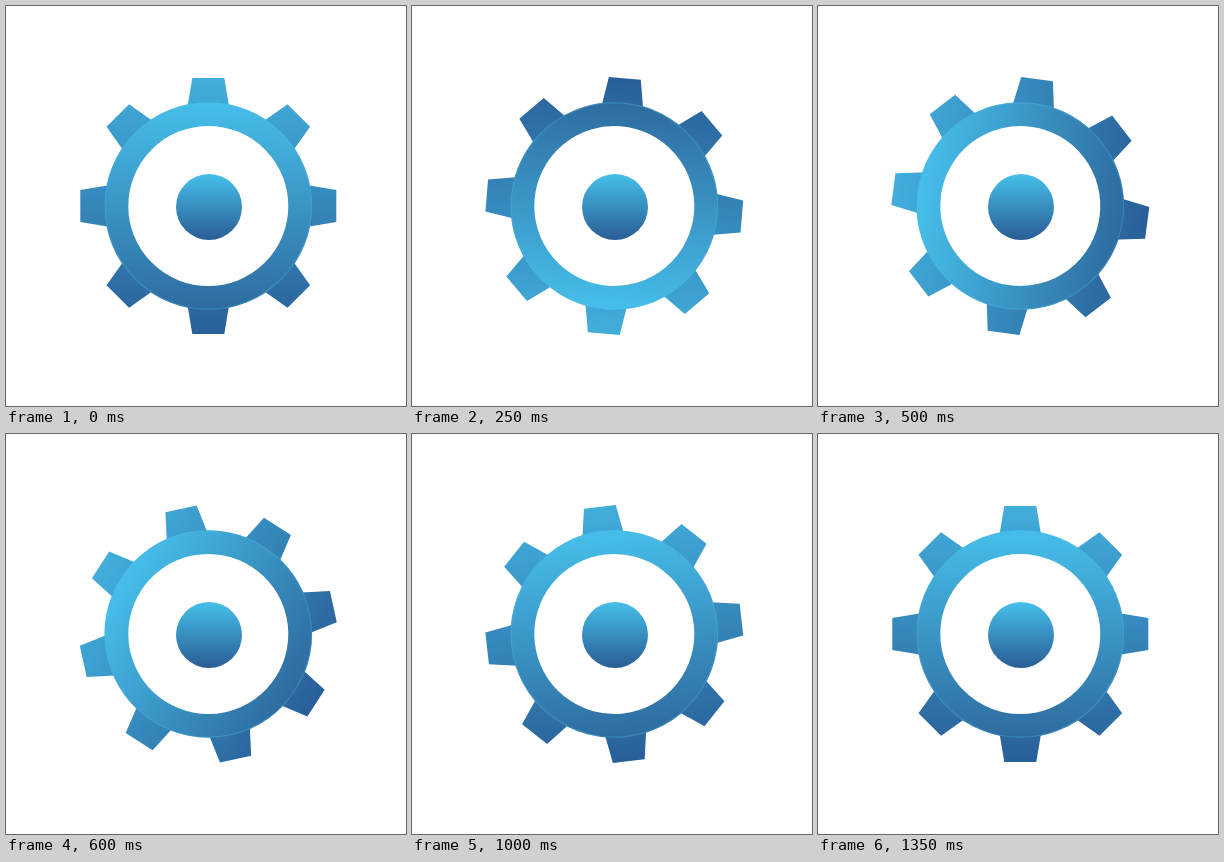
Recreate the animation shown at these times as an HTML page. Size 400 by 400 pixels, loop 1500 ms.

```html
<!DOCTYPE html>
<html lang="en">
<head>
<meta charset="utf-8">
<title>Gear</title>
<style>
  html, body { margin: 0; width: 100%; height: 100%; overflow: hidden; background: #fff; }
  svg { display: block; width: 100%; height: 100%; }
</style>
</head>
<body>
<svg viewBox="0 0 400 400">
  <defs>
    <linearGradient id="teethFill" gradientUnits="userSpaceOnUse" x1="0" y1="-128" x2="0" y2="128">
      <stop offset="0" stop-color="#41aedc"/>
      <stop offset="1" stop-color="#295f98"/>
    </linearGradient>
    <linearGradient id="ringFill" gradientUnits="userSpaceOnUse" x1="0" y1="-104" x2="0" y2="104">
      <stop offset="0" stop-color="#46bfea"/>
      <stop offset="1" stop-color="#2e6b9f"/>
    </linearGradient>
    <linearGradient id="hubFill" x1="0" y1="0" x2="0" y2="1">
      <stop offset="0" stop-color="#46bfea"/>
      <stop offset="1" stop-color="#295d94"/>
    </linearGradient>
  </defs>
  <g id="gear">
    <path id="teeth" fill="url(#teethFill)"/>
    <circle r="91.9" fill="none" stroke="url(#ringFill)" stroke-width="23.8"/>
    <circle r="103.2" fill="none" stroke="#4db4e2" stroke-opacity=".35" stroke-width="1.2"/>
  </g>
  <circle cx="203" cy="201" r="33" fill="url(#hubFill)"/>
</svg>
<script>
  const LOOP = 1500, STEP = 50, LEAD = 55, SPIN = 1430;
  const gear = document.getElementById('gear');

  // One tapered tooth, repeated every 45 degrees.
  const tooth = [[-21.5, -95], [-16, -128], [16, -128], [21.5, -95]];
  const turn = ([x, y], a) => [
    (x * Math.cos(a) - y * Math.sin(a)).toFixed(2),
    (x * Math.sin(a) + y * Math.cos(a)).toFixed(2)
  ];
  document.getElementById('teeth').setAttribute('d', Array.from({ length: 8 }, (_, i) =>
    'M' + tooth.map(p => turn(p, i * Math.PI / 4)).join('L') + 'Z').join(''));

  // Rest for one step, then jump into a cubic ease-out turn.
  function angleAt(time) {
    const t = Math.floor(time / STEP) * STEP;
    if (t === 0) return 0;
    const left = Math.max(0, 1 - (t + LEAD) / SPIN);
    return 360 * (1 - left ** 3);
  }

  function draw() {
    const angle = angleAt(performance.now() % LOOP);
    gear.setAttribute('transform', `translate(202.3 200) rotate(${angle.toFixed(3)})`);
    requestAnimationFrame(draw);
  }
  draw();
</script>
</body>
</html>
```
